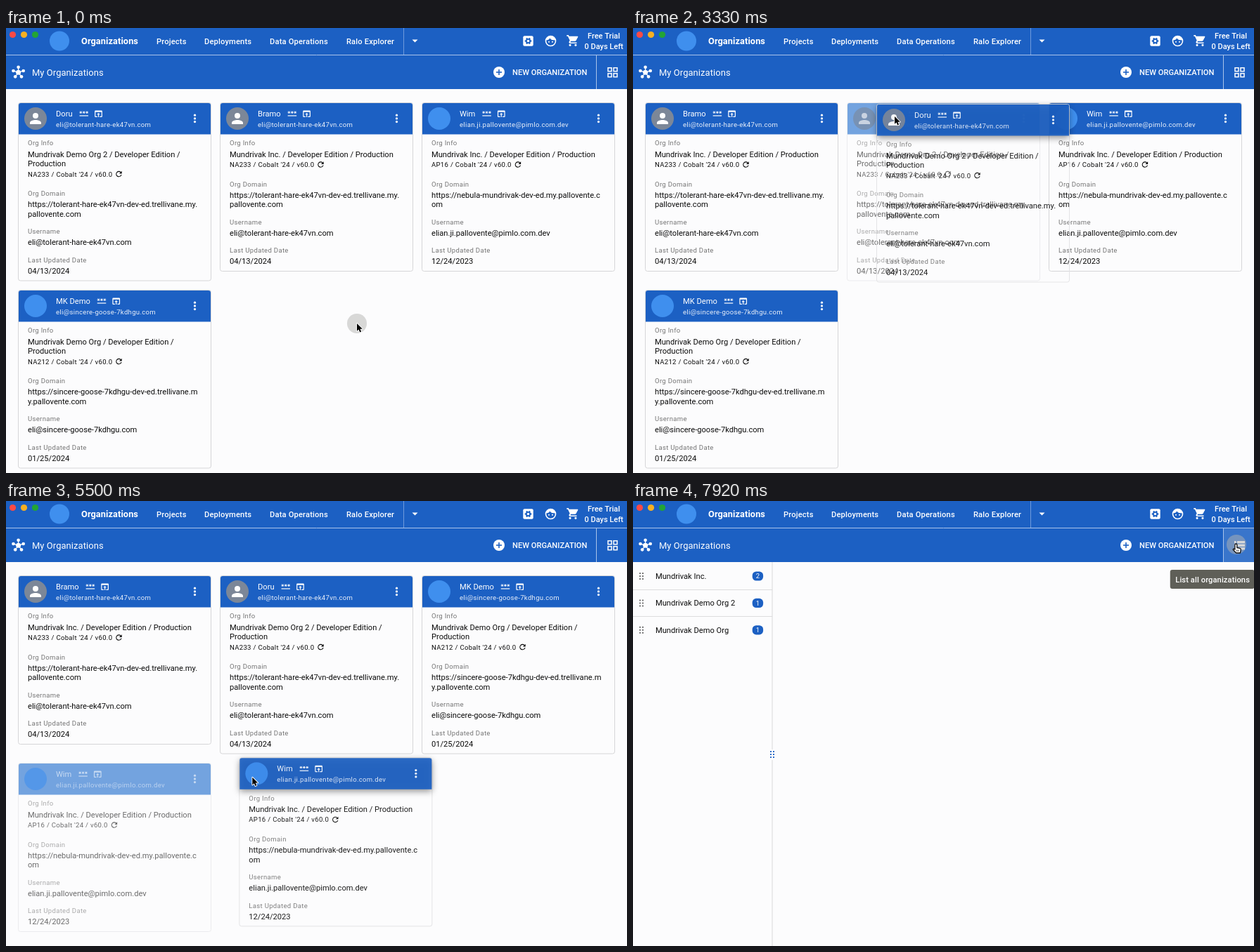
An HTML page with a canvas that plays this animation: 883 by 634 pixels, repeating every 8 s.

```html
<!DOCTYPE html>
<html lang="en">
<head>
<meta charset="utf-8">
<title>Organizations</title>
<style>
html, body { margin: 0; width: 100%; height: 100%; overflow: hidden; background: #fcfcfd; }
canvas { display: block; }
</style>
</head>
<body>
<canvas id="stage" width="883" height="634"></canvas>
<script>
const ctx = document.getElementById('stage').getContext('2d');
const LOOP = 8000, TICK = 1000 / 12;
const BLUE = '#1c60c3', PAGE = '#fcfcfd', LOGO = '#3f8fee', INK = '#0c0c0c', GREY = '#757575';
const BODY = 11.13, SMALL = 9.54, SMALL_GAP = 0.318;
const SLOTS = [[18, 107], [305, 107], [592, 107], [18, 374]];
const CARD_W = 273, HEAD_H = 44.5, WRAP = 13.5;

const person = new Path2D('M12 12a4 4 0 1 0 0-8 4 4 0 0 0 0 8zm0 2c-2.7 0-8 1.3-8 4v2h16v-2c0-2.7-5.3-4-8-4z');
const openIcon = new Path2D('M19 4H5a2 2 0 0 0-2 2v12a2 2 0 0 0 2 2h4v-2H5V8h14v10h-4v2h4a2 2 0 0 0 2-2V6a2 2 0 0 0-2-2zm-7 6l-4 4h3v6h2v-6h3z');
const refresh = new Path2D('M17.65 6.35A8 8 0 1 0 19.73 14h-2.08A6 6 0 1 1 16.22 7.78L13 11h7V4z');
const cart = new Path2D('M1 2v2h2l3.6 7.6-1.4 2.4c-.7 1.4.3 3 1.8 3h12v-2H7.4l1-2h7.5c.8 0 1.4-.4 1.8-1l3.5-6.5c.4-.7-.1-1.5-.9-1.5H5.2l-.9-2zM9 20a2 2 0 1 0-4 0 2 2 0 0 0 4 0zm10 0a2 2 0 1 0-4 0 2 2 0 0 0 4 0z');
const arrow = new Path2D('M0 0v10.8l2.5-2.3 1.7 3.9 1.9-.8-1.7-3.8h3.4z');
const hand = new Path2D('M-1.6 1a1.5 1.5 0 0 1 3 0v4l4 .8q1.6.4 1.4 2l-.8 4.7h-5.8l-4.2-4.3q-.6-1.4.8-1.6l1.6 1z');

const host = 'tolerant-hare-ek47vn', host2 = 'sincere-goose-7kdhgu';
const doru = {
  name: 'Doru', mail: `eli@${host}.com`, org: ['Mundrivak Demo Org 2 / Developer Edition /', 'Production'],
  pod: 'NA233', url: [`https://${host}-dev-ed.trellivane.my.`, 'pallovente.com'], date: '04/13/2024'
};
const bramo = { ...doru, name: 'Bramo', org: ['Mundrivak Inc. / Developer Edition / Production'] };
const wim = {
  name: 'Wim', mail: 'elian.ji.pallovente@pimlo.com.dev', org: bramo.org, logo: true,
  pod: 'AP16', url: ['https://nebula-mundrivak-dev-ed.my.pallovente.c', 'om'], date: '12/24/2023'
};
const demo = {
  name: 'MK Demo', mail: `eli@${host2}.com`, org: ['Mundrivak Demo Org / Developer Edition /', 'Production'], logo: true,
  pod: 'NA212', url: [`https://${host2}-dev-ed.trellivane.m`, 'y.pallovente.com'], date: '01/25/2024'
};

// Tracks hold [tick, x, y] points.
const pointerTrack = [
  [4, 499, 421], [5, 465, 375], [7, 300, 150], [9, 105, 19], [11, 43, 130], [13, 43, 130],
  [14, 75, 135], [17, 349, 173], [18, 315, 166], [20, 75, 130], [21, 44, 126], [28, 45, 127],
  [29, 54, 124], [32, 141, 113], [38, 344, 122], [40, 372, 126], [46, 372, 126],
  [47, 400, 130], [52, 820, 150], [53, 800, 148], [56, 624, 136], [60, 624, 136],
  [61, 590, 175], [62, 534, 253], [65, 380, 375], [68, 291, 431], [73, 291, 431],
  [74, 448, 407], [75, 540, 377], [76, 577, 364], [77, 577, 364],
  [78, 592, 348], [84, 785, 140], [86, 830, 75], [87, 858, 62]
];
const dragTracks = [
  { card: doru, from: 29, to: 47, path: [[28, 18, 107], [29, 26, 106], [32, 111, 96], [38, 319, 105], [40, 347, 109]] },
  { card: wim, from: 61, to: 74, path: [[60, 592, 107], [61, 580, 124], [62, 545, 173], [65, 365, 345], [68, 267, 409]] }
];

function along(track, tick) {
  const i = track.findIndex(p => p[0] >= tick);
  if (i === 0) return track[0].slice(1);
  if (i < 0) return track[track.length - 1].slice(1);
  const [a, b] = [track[i - 1], track[i]], k = (tick - a[0]) / (b[0] - a[0]);
  return [a[1] + (b[1] - a[1]) * k, a[2] + (b[2] - a[2]) * k];
}

const within = (tick, from, to) => tick >= from && tick < to;

function text(str, x, y, color = INK, size = BODY, weight = 400, gap = 0) {
  ctx.font = `${weight} ${size}px Roboto, sans-serif`;
  ctx.letterSpacing = gap + 'px';
  ctx.fillStyle = color;
  ctx.fillText(str, x, y);
  return x + ctx.measureText(str).width;
}
const small = (str, x, y, color) => text(str, x, y, color, SMALL, 400, SMALL_GAP);

function box(x, y, w, h, color, r = 0) {
  ctx.fillStyle = color;
  ctx.beginPath();
  ctx.roundRect(x, y, w, h, r);
  ctx.fill();
}

function dot(x, y, r, color = '#fff') {
  ctx.fillStyle = color;
  ctx.beginPath();
  ctx.arc(x, y, r, 0, 7);
  ctx.fill();
}

function line(x1, y1, x2, y2, color = '#fff', width = 1) {
  ctx.strokeStyle = color;
  ctx.lineWidth = width;
  ctx.beginPath();
  ctx.moveTo(x1, y1);
  ctx.lineTo(x2, y2);
  ctx.stroke();
}

function icon(path, x, y, size, color = '#fff') {
  ctx.save();
  ctx.translate(x, y);
  ctx.scale(size / 24, size / 24);
  ctx.fillStyle = color;
  ctx.fill(path);
  ctx.restore();
}

function grip(x, y, color) {
  for (let i = 0; i < 6; i++) box(x - 3 + (i % 2) * 4, y - 5 + (i >> 1) * 4, 2, 2, color, 0.6);
}

function star(x, y) {
  for (let i = 0; i < 3; i++) {
    const a = i * Math.PI / 3, dx = Math.cos(a) * 1.9, dy = Math.sin(a) * 1.9;
    line(x - dx, y - dy, x + dx, y + dy, '#fff', 0.9);
  }
}

function drawCard(c, x, y, mode) {
  const extra = (c.org.length - 1) * WRAP;
  const height = 239.5 + extra;
  ctx.save();
  ctx.globalAlpha = mode === 'ghost' ? 0.6 : mode === 'drag' ? 0.92 : 1;

  ctx.strokeStyle = mode ? '#e2e2e4' : '#d6d6d8';
  ctx.lineWidth = 1;
  ctx.beginPath();
  ctx.roundRect(x - 0.5, y - 0.5, CARD_W + 1, height + 0.5, 3);
  ctx.stroke();

  if (mode === 'drag') {
    ctx.shadowColor = 'rgba(0,0,0,.45)';
    ctx.shadowBlur = 10;
    ctx.shadowOffsetY = 3;
  }
  box(x, y, CARD_W, HEAD_H, mode === 'ghost' ? '#1a6acb' : BLUE, [3, 3, 0, 0]);
  ctx.shadowColor = 'transparent';

  if (c.logo) dot(x + 24, y + 22, 16, LOGO);
  else {
    dot(x + 24, y + 22, 16, '#7c8798');
    icon(person, x + 12, y + 10, 24);
  }
  const end = text(c.name, x + 53, y + 18.5, '#fff');
  small(c.mail, x + 53, y + 34, '#eaf0fa');
  for (let i = 0; i < 3; i++) {
    star(end + 11.8 + i * 4.4, y + 13.2);
    dot(x + 250.5, y + 17.2 + i * 4.7, 1.6);
  }
  line(end + 10, y + 18, end + 22.5, y + 18, '#fff', 1.2);
  icon(openIcon, end + 29.8, y + 8, 14.3);

  const tx = x + 13, lines = (rows, ty) => rows.forEach((s, i) => text(s, tx, ty + i * WRAP));
  small('Org Info', tx, y + 60.3, GREY);
  lines(c.org, y + 76.5);
  y += extra;
  const podEnd = small(`${c.pod} / Cobalt '24 / v60.0`, tx, y + 91, INK);
  icon(refresh, podEnd + 2.8, y + 81.2, 12.7, INK);
  small('Org Domain', tx, y + 118.8, GREY);
  lines(c.url, y + 134.8);
  small('Username', tx, y + 172.8, GREY);
  text(c.mail, tx, y + 188.8);
  small('Last Updated Date', tx, y + 213.3, GREY);
  text(c.date, tx, y + 229.3);
  ctx.restore();
}

function drawBars(tick) {
  box(0, 0, 883, 87, BLUE);
  if (within(tick, 85, 89)) box(678, 39, 161, 48, `rgba(255,255,255,${tick < 88 ? 0.12 : 0.06})`);
  if (tick >= 87) box(840, 39, 43, 48, 'rgba(255,255,255,.13)');
  line(0, 38.5, 883, 38.5, '#a9c3ea');
  line(565.5, 0, 565.5, 38, '#6f9bdc');
  line(839.5, 39, 839.5, 87, '#a9c3ea');

  dot(9.5, 9.5, 4.6, '#fb4a45');
  dot(25.5, 9.5, 4.6, '#f8b022');
  dot(41.5, 9.5, 4.6, '#23a535');
  dot(76, 18.5, 14, LOGO);

  text('Organizations', 107, 22.5, '#fff', 12.72, 700, 0.1);
  [['Projects', 214], ['Deployments', 282], ['Data Operations', 375], ['Ralo Explorer', 484]]
    .forEach(([s, x]) => text(s, x, 22.5, '#fff', BODY, 500, 0.17));
  ctx.beginPath();
  ctx.moveTo(577.5, 16.5);
  ctx.lineTo(585.5, 16.5);
  ctx.lineTo(581.5, 20.5);
  ctx.fill();

  // settings
  box(735.3, 11.3, 14.4, 14.4, '#fff', 2);
  for (let i = 0; i < 3; i++) {
    const a = i * Math.PI / 3, dx = Math.cos(a) * 4.8, dy = Math.sin(a) * 4.8;
    line(742.5 - dx, 18.5 - dy, 742.5 + dx, 18.5 + dy, BLUE, 2.2);
  }
  dot(742.5, 18.5, 3.6, BLUE);
  dot(742.5, 18.5, 1.7);

  // face
  dot(774.5, 18.5, 7.8);
  ctx.fillStyle = BLUE;
  ctx.beginPath();
  ctx.arc(774.5, 18.5, 6.2, -0.2, Math.PI + 0.2);
  ctx.quadraticCurveTo(772, 17.5, 773, 14.5);
  ctx.quadraticCurveTo(775.5, 17.8, 780.5, 17.2);
  ctx.fill();
  dot(772, 19.8, 1);
  dot(777, 19.8, 1);

  icon(cart, 796.5, 8.5, 19);
  text('Free Trial', 827, 14.7, '#fff', 11, 500);
  text('0 Days Left', 822.5, 29.7, '#fff', 11, 500);

  // hub
  for (let i = 0; i < 5; i++) {
    const a = (i * 0.4 - 0.5) * Math.PI, x = 17.6 + Math.cos(a) * 7.5, y = 63.3 + Math.sin(a) * 7.5;
    line(17.6, 63.3, x, y, '#fff', 1.3);
    dot(x, y, 2.3);
  }
  dot(17.6, 63.3, 3.5);
  text('My Organizations', 37, 67.7, '#fff', 12.9, 400, 0.1);

  dot(701, 63, 8);
  line(697, 63, 705, 63, BLUE, 1.6);
  line(701, 59, 701, 67, BLUE, 1.6);
  text('NEW ORGANIZATION', 720, 67, '#fff', BODY, 500);

  if (tick < 91) {
    ctx.strokeStyle = '#fff';
    ctx.lineWidth = 1.5;
    for (let i = 0; i < 4; i++) ctx.strokeRect(856 + (i % 2) * 8, 56.7 + (i >> 1) * 8, 5, 5);
  } else {
    for (let i = 0; i < 3; i++) {
      box(855, 57 + i * 4.6, 2.6, 3.2, '#fff');
      box(859, 57 + i * 4.6, 11, 3.2, '#fff');
    }
  }
}

function drawList() {
  [['Mundrivak Inc.', 2], ['Mundrivak Demo Org 2', 1], ['Mundrivak Demo Org', 1]].forEach(([name, n], i) => {
    const y = 107 + i * 38.4;
    grip(12, y, '#6a6a6a');
    text(name, 32, y + 3.8);
    box(169.7, y - 6.6, 15.4, 13.2, BLUE, 5.5);
    text(n, 174.7, y + 3.4, '#fff', SMALL);
    if (i < 2) line(0, Math.round(y + 19) + 0.5, 198, Math.round(y + 19) + 0.5, '#dcdcde');
  });
  line(198, 87, 198, 634, '#d8d8da');
  box(194, 354, 8, 15, PAGE);
  grip(198, 361, BLUE);
}

function tooltip(str, alpha) {
  ctx.save();
  ctx.globalAlpha = alpha;
  ctx.font = `500 ${BODY}px Roboto, sans-serif`;
  ctx.letterSpacing = '0.1px';
  const x = 877 - ctx.measureText(str).width;
  box(x - 7.5, 98, 891 - x, 27, '#5f5f58', 3);
  text(str, x, 115.7, '#fff', BODY, 500, 0.1);
  ctx.restore();
}

function drawMoveCross() {
  const cross = new Path2D();
  for (let i = 0; i < 4; i++) {
    const turn = new DOMMatrix().rotate(i * 90);
    cross.addPath(new Path2D('M-.6 0V-3.6H-2.2L0-6 2.2-3.6H.6V0z'), turn);
  }
  ctx.lineWidth = 1.4;
  ctx.stroke(cross);
  ctx.fill(cross);
}

function drawPointer(tick, dragging) {
  const [x, y] = along(pointerTrack, tick);
  if (!dragging) {
    const [hx, hy] = tick === 74 ? [291, 431] : [x, y];
    dot(hx, hy, 14, 'rgba(180,180,178,.5)');
  }
  const moving = within(tick, 11, 14) || within(tick, 20, 29) || within(tick, 57, 61);
  ctx.save();
  ctx.translate(x, y);
  ctx.lineJoin = 'round';
  ctx.strokeStyle = '#fff';
  ctx.fillStyle = '#000';
  if (moving) drawMoveCross();
  else if (tick >= 86) {
    ctx.translate(-0.5, -0.5);
    ctx.strokeStyle = '#111';
    ctx.fillStyle = '#fff';
    ctx.lineWidth = 1.3;
    ctx.fill(hand);
    ctx.stroke(hand);
    for (const fx of [1.2, 3.2]) line(fx, 8, fx, 10.5, '#111', 0.8);
  } else {
    ctx.lineWidth = 1.8;
    ctx.stroke(arrow);
    ctx.fill(arrow);
  }
  ctx.restore();
}

function draw(tick) {
  box(0, 0, 883, 634, PAGE);
  const drag = dragTracks.find(d => within(tick, d.from, d.to));
  if (tick < 91) {
    const order = tick < 39 ? [doru, bramo, wim, demo]
      : tick < 66 ? [bramo, doru, wim, demo] : [bramo, doru, demo, wim];
    order.forEach((c, i) => drawCard(c, ...SLOTS[i], drag && drag.card === c ? 'ghost' : ''));
  } else drawList();
  drawBars(tick);
  if (drag) drawCard(drag.card, ...along(drag.path, tick), 'drag');
  if (within(tick, 88, 91)) tooltip('Group by organizations', tick === 88 ? 0.5 : 1);
  if (tick >= 93) tooltip('List all organizations', (tick - 92) / 3);
  drawPointer(tick, drag);
}

function play() {
  const ms = performance.now() % LOOP;
  draw(Math.min(95, Math.floor((ms + 5) / TICK)));
  requestAnimationFrame(play);
}
play();
</script>
</body>
</html>
```
